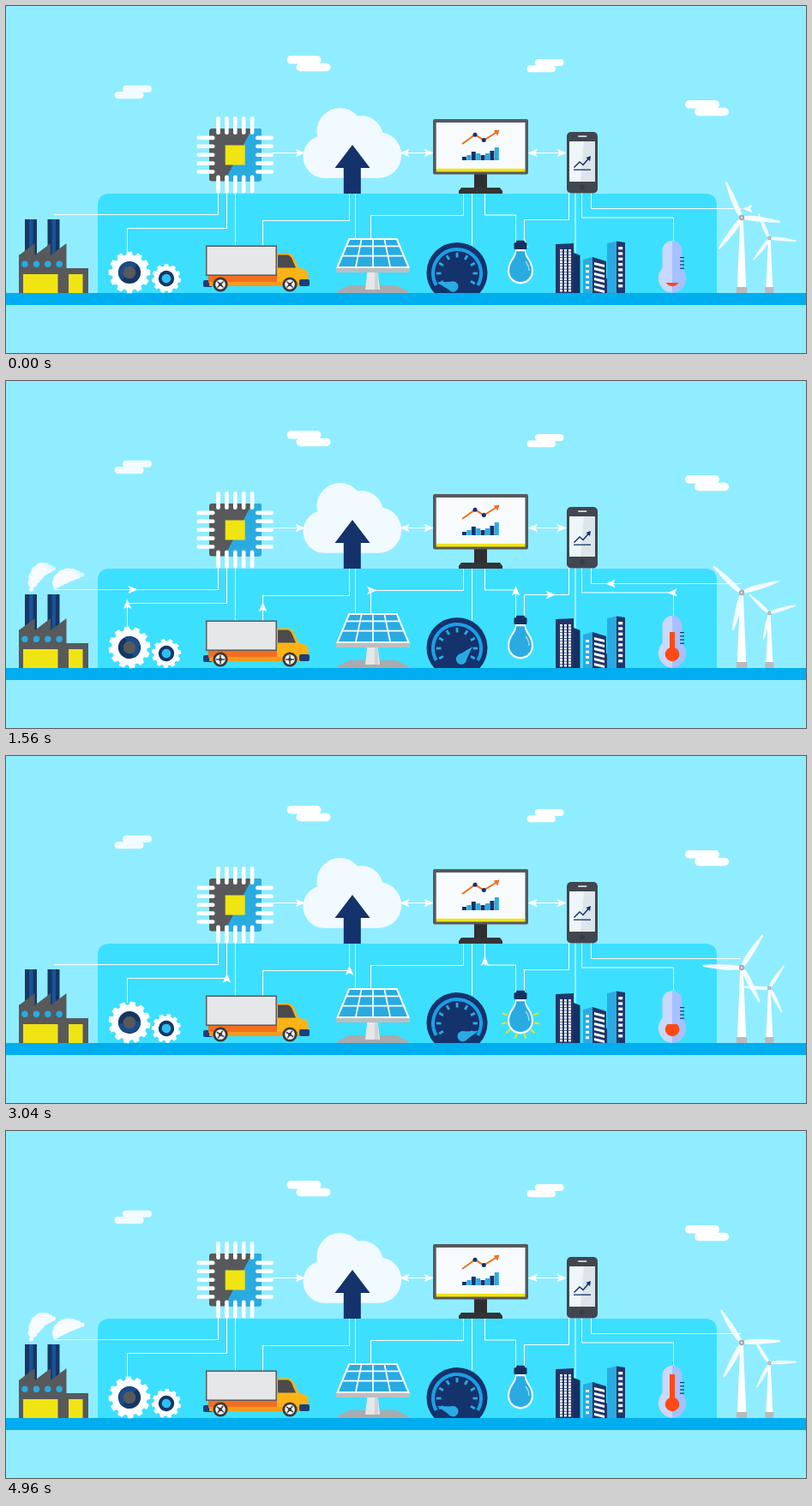
These frames come from a looping animation (933 by 405 pixels, 5 s). An HTML page:

```html
<!DOCTYPE html>
<html lang="en">
<head>
<meta charset="utf-8">
<title>Connected city</title>
<style>
html, body { margin: 0; width: 100%; height: 100%; overflow: hidden; background: #90edff; }
svg { display: block; width: 933px; height: 405px; }
</style>
</head>
<body>
<svg id="stage" viewBox="0 0 933 405" xmlns="http://www.w3.org/2000/svg"></svg>
<script>
const LOOP = 5000, STEP = 40, TOP = 218;
const NAVY = '#14326b', BLUE = '#29abe2', GREY = '#58595b', YELLOW = '#f0e513', ORANGE = '#f26f21';
const stage = document.getElementById('stage');
const $ = id => document.getElementById(id);

// Markup helpers
const each = (n, f) => Array.from({ length: n }, (_, i) => f(i)).join('');
const rect = (x, y, w, h, fill, r = 0) =>
  `<rect x="${x}" y="${y}" width="${w}" height="${h}" rx="${r}" fill="${fill}"/>`;
const disc = (x, y, r, fill) => `<circle cx="${x}" cy="${y}" r="${r}" fill="${fill}"/>`;
const poly = (points, fill) => `<polygon points="${points}" fill="${fill}"/>`;
const path = (d, fill) => `<path d="${d}" fill="${fill}"/>`;
const line = (d, stroke, w) => `<path d="${d}" fill="none" stroke="${stroke}" stroke-width="${w}"/>`;
const group = (id, body, at = '0 0') => `<g id="${id}" transform="translate(${at})">${body}</g>`;
const spin = (n, body) => each(n, i => `<g transform="rotate(${i * 360 / n})">${body}</g>`);
const spoke = (cx, cy, r1, r2, deg, stroke, w) => {
  const a = deg * Math.PI / 180, c = Math.cos(a), s = Math.sin(a);
  return line(`M${cx + r1 * c} ${cy + r1 * s}L${cx + r2 * c} ${cy + r2 * s}`, stroke, w);
};
// Trapezoid with a vertical axis at x
const taper = (x, y1, w1, y2, w2, fill) =>
  poly([x - w1 / 2, y1, x + w1 / 2, y1, x + w2 / 2, y2, x - w2 / 2, y2], fill);

// Timing helpers
const ramp = (t, a, b) => b > a ? Math.max(0, Math.min(1, (t - a) / (b - a))) : +(t >= b);
const ease = (t, a, b) => { const p = ramp(t, a, b); return p * p * (3 - 2 * p); };

// Each wire rises from (x, y) to a level, runs to another column, then climbs;
// its arrow does one leg between each pair of times
const ROUTES = [
  { x: 56, y: 243.5, level: 243.5, to: 247.5, at: [.67, .67, 2.5, 3] },
  { x: 141.5, y: 288, level: 259.5, to: 257.5, at: [.67, 1.67, 3, 4] },
  { x: 299.5, y: 283, level: 250.5, to: 400.5, at: [1, 2, 3, 4] },
  { x: 425.5, y: 275, level: 244.5, to: 533.5, at: [.5, 1.5, 2.5, 3] },
  { x: 594.5, y: 277, level: 244, to: 558.5, at: [.67, 1.67, 2.85, 3.5] },
  { x: 604.5, y: 277, level: 249.5, to: 656.5, at: [0, 1, 2, 3] },
  { x: 865, y: 236.5, level: 236.5, to: 682.5, at: [0, 0, 2, 3] },
  { x: 778.5, y: 278, level: 247, to: 671.5, at: [.5, 1.5, 2.5, 3] }
];
const HEAD = 'M6 0L-5.5 -4.7L-3 0L-5.5 4.7Z';

function sky() {
  const puff = (x, y, w, dx, fill) => {
    const h = w * .24;
    return rect(x, y, w, h, fill, h / 2) + rect(x + dx, y + h * .9, w, h, fill, h / 2);
  };
  return puff(136, 92.7, 34, -9.5, '#f2fcff') + puff(327.5, 58, 40, 11, '#fff') +
    puff(617, 62, 33.5, -9.5, '#fff') + puff(792, 110, 40, 11, '#fff') +
    path('M107 335V233Q107 219 121 219H815Q829 219 829 233V335Z', '#3ddfff') +
    rect(0, 335, 933, 14, '#00aeef');
}

function wires() {
  const head = (x, deg) => `<path d="${HEAD}" fill="#fff" transform="translate(${x} 171.5) rotate(${deg})"/>`;
  const link = (a, b, both) => line(`M${a} 171.5H${b}`, '#fff', 1) + head(b - 5, 0) + (both ? head(a + 5, 180) : '');
  const stub = (x, y) => line(`M${x} ${TOP}V${y}`, '#fff', 1);
  return ROUTES.map(r => line(`M${Math.min(r.x, 857)} ${r.y}V${r.level}H${r.to}V${TOP}`, '#fff', 1)).join('') +
    stub(267.5, 280) + stub(407.5, 273) + stub(543.5, 279) + stub(664, 292) +
    link(311, 348, false) + link(460, 498, true) + link(609.5, 653, true);
}

function chip() {
  const pins = spin(4, each(5, i => rect(-22.1 + i * 9.9, -44.8, 4.6, 21, '#fff', 2)));
  return rect(237, 143, 61, 61.5, GREY, 3) +
    path('M287 143H295Q298 143 298 146V201.5Q298 204.5 295 204.5H255Z', BLUE) +
    group('pins', pins, '267.3 173.7') + rect(255.7, 162.5, 23, 23, YELLOW);
}

function cloud() {
  const fill = '#f1faff';
  return disc(371.5, 175.8, 25, fill) + disc(389.5, 146, 27, fill) + disc(414.5, 153.5, 25.5, fill) +
    disc(434.5, 174, 26.7, fill) + rect(371, 150, 64, 50.8, fill) +
    taper(404, 162, 0, 189, 41, NAVY) + rect(393.8, 188, 20, 31, NAVY);
}

function monitor() {
  const bars = [4, 6, 10, 8, 6, 8, 11, 15];
  return rect(546, 195, 15, 19, '#2f2f31') + taper(553.5, 212, 45, 216, 51, '#333437') +
    rect(528, 215.5, 51, 3.5, '#333437') +
    rect(498, 132, 111, 64.5, GREY, 2) + rect(501.7, 136, 103.8, 54.5, '#f7fbfe') +
    rect(501.7, 189.8, 103.8, 3.7, YELLOW) +
    bars.map((h, i) => rect(532 + i * 5.4, 180 - h, 5, h, i % 2 ? BLUE : NAVY)).join('') +
    line('M532 161L547 150.3L557.3 156.5L572 147.5', ORANGE, 2) +
    poly('575.5,144.5 573.3,151.5 568.5,145.5', ORANGE) +
    disc(547, 150.3, 2.5, NAVY) + disc(557.3, 156.5, 2.5, NAVY);
}

function phone() {
  return rect(654, 147, 36, 71.5, '#414650', 5) + rect(657, 158, 30, 47, '#dce5e9') +
    poly('657,158 674,158 670,205 657,205', '#eff6f9') +
    rect(667, 151.2, 10.5, 1.8, '#d5dbe0', 0.9) + disc(672, 211.5, 3, '#383c45') +
    line('M662.5 188.5L669 182L673 185.5L679.5 178', NAVY, 1.5) +
    poly('682,175 681,181 676.5,177', NAVY) + rect(662, 190.5, 20, 1.3, NAVY);
}

function factory() {
  const stack = x => rect(x, 249, 14, 45, '#143764') + rect(x + 5, 249, 4.5, 45, '#1b5299');
  return stack(22) + stack(48.5) +
    each(3, i => poly([15 + i * 18.5, 291, 33.5 + i * 18.5, 277, 33.5 + i * 18.5, 291], GREY)) +
    rect(15, 290.5, 55.5, 44.5, GREY) + rect(15, 306, 81, 29, GREY) +
    each(4, i => disc(22 + i * 13.4, 301.3, 3.7, BLUE)) +
    rect(20, 313, 40.5, 22, YELLOW) + rect(73, 313, 16.5, 22, YELLOW);
}

// Discs that swell and shrink along a bend from the chimney to the tip,
// in one path so that overlaps do not add up
const PLUMES = [{ x: 29.5, y: 243, dx: 26, dy: -24 }, { x: 57.5, y: 240, dx: 31.5, dy: -14 }];
const plume = p => each(8, i => {
  const u = i / 7, r = 2.6 + 6 * Math.sin(Math.PI * u ** .9);
  const x = p.x + p.dx * u ** 1.4, y = p.y + p.dy * Math.sin(Math.PI / 2 * Math.min(1, u * 1.4));
  return `M${x - r} ${y}a${r} ${r} 0 1 1 ${2 * r} 0a${r} ${r} 0 1 1 ${-2 * r} 0`;
});
const smoke = () => PLUMES.map((p, i) =>
  `<linearGradient id="mist${i}" gradientUnits="userSpaceOnUse"><stop stop-color="#f5fbff"/>` +
  `<stop offset="1" stop-color="#f5fbff" stop-opacity="0"/></linearGradient>` +
  path(plume(p), `url(#mist${i})`)).join('');

function gears() {
  const gear = (r, teeth) => disc(0, 0, r * .85, '#fff') +
    spin(teeth, taper(0, -r, r * .24, -r * .7, r * .38, '#fff')) + disc(0, 0, r * .54, '#143764');
  return group('gearA', gear(24.3, 12) + path('M-9.3 9.3A13.2 13.2 0 0 1 9.3 -9.3Z', '#1b4c8c') +
      disc(0, 0, 7.3, GREY), '144 311') +
    group('gearB', gear(17, 11) + disc(0, 0, 5.3, '#2cc0f2'), '187 318');
}

function truck() {
  const wheel = (id, x) => disc(x, 325, 8.6, '#39393c') + group(id, disc(0, 0, 5.8, '#f3f3f3') +
    line('M-5 0H5M0 -5V5', '#4a4a4d', 1.6) + disc(0, 0, 2, '#39393c'), `${x} 325`);
  return rect(230, 320, 11, 8, '#1b3f7a', 2) +
    path('M315 288.5H328Q333 288.5 335.5 293L341 305L349 308Q352 309 352.5 313L353 327H315Z', '#fcb316') +
    path('M317 290.5H327.5Q331.5 290.5 333.5 295L338 305.5H317Z', '#4b4a4c') +
    rect(236, 314, 80, 9, ORANGE) + rect(237, 322, 104, 5, '#f79a1c') +
    rect(342, 319, 12, 8, '#1b3f7a', 2) +
    '<rect x="233.7" y="280.2" width="81.5" height="34" fill="#e6e7e8" stroke="#58595b" stroke-width="1.5"/>' +
    wheel('wheelA', 250) + wheel('wheelB', 331);
}

function solar() {
  const width = v => 54 + 26 * v, y = v => 273 + 31 * v;
  const column = u => `M${428 + u * width(0)} ${y(0)}L${428 + u * width(1)} ${y(1)}`;
  const row = v => `M${428 - width(v) / 2} ${y(v)}h${width(v)}`;
  return taper(427.7, 326, 55, 333, 83, '#a9abae') + rect(386, 333, 83.5, 2, '#a9abae') +
    taper(427.5, 308, 12, 331, 17, '#e6e7e8') + rect(430, 308, 4, 23, '#d0d2d3') +
    taper(428, 271, 57, 306, 86, '#fff') + rect(385, 306, 86, 5, '#bcbec0', 1) +
    taper(428, y(0), width(0), y(1), width(1), BLUE) +
    line(column(-.25) + column(0) + column(.25) + row(.24) + row(.6), '#fff', 1.7);
}

function gauge() {
  return path('M499.5 335A35.5 35.5 0 1 1 552.5 335Z', NAVY) +
    line('M501.8 326A28 28 0 1 1 550.2 326', '#1aa0e8', 4) +
    each(9, i => spoke(526, 312, 18.5, 24, 150 + i * 30, BLUE, 2.8)) +
    group('needle', disc(0, -6, 6.2, BLUE) + taper(0, -25.5, 0, -9, 10, BLUE));
}

function bulb() {
  const glass = (y, s, fill) => `<path d="M-5.5 -26H5.5C6 -16 15 -12 15 .5A15 15 0 0 1 -15 .5C-15 -12 -6 -16 -5.500 -26Z"
    fill="${fill}" transform="translate(600 ${y}) scale(${s})"/>`;
  return group('rays', each(8, i => spoke(600, 308, 16.5, 22.5, 200 - i * 220 / 7, '#e8e31c', 2))) +
    glass(309, 1, '#fff') + glass(308.7, .86, BLUE) + line('M606 298Q610 303 610 309', '#8fdcf7', 1.5) +
    rect(592.5, 276, 15, 8, '#14305e', 1.5) + rect(595, 273.8, 10, 3, '#14305e', 1);
}

function city() {
  const dark = '#20366b';
  // Block whose roof runs from y1 to y2
  const block = (x, w, y1, y2, fill) => poly([x, 335, x, y1, x + w, y2, x + w, 335], fill);
  const windows = (x, y, rows, step, w, h, tilt = 0) => each(rows, i =>
    poly([x, y + i * step, x + w, y + tilt + i * step, x + w, y + tilt + h + i * step, x, y + h + i * step], '#fff'));
  return block(641, 21, 278, 277, dark) + block(662, 7.5, 288, 291, '#17305f') +
    each(3, i => windows(646 + i * 5, 284, 15, 3.35, 2.9, 2.6)) +
    block(673, 11, 296, 293, BLUE) + windows(676, 302, 5, 6.3, 4, 3) +
    block(684, 16, 293, 298, dark) + windows(686, 299, 6, 6, 12, 2.9, 3) +
    rect(698, 318, 15, 17, dark) + block(701, 11, 277, 274.5, BLUE) +
    block(712, 10, 274.5, 276, dark) + windows(714.2, 281, 8, 6.3, 5, 3.3);
}

function thermo() {
  const half = (sweep, fill) => path(`M777 274A11.5 11.5 0 0 ${sweep} ${sweep ? 788.5 : 765.5} 285.5V306` +
    `A17.3 17.3 0 0 ${sweep} 777 335Z`, fill);
  return half(0, '#c9d8ff') + half(1, '#a6c1ff') +
    '<clipPath id="level"><rect id="mercury" x="764" width="26" height="60"/></clipPath>' +
    `<g clip-path="url(#level)">${rect(774, 284, 6, 36, '#ff4a17') + disc(777, 319, 8.3, '#ff4a17')}</g>` +
    each(4, i => rect(786, 293 + i * 4.2, 5, 1.2, NAVY));
}

function turbine(id, x, y, s, w) {
  const blade = path('M1 -1.5C9 -4.5 20 -4 44.5 -1Q46.5 0 44.5 1.2C26 3 10 3 1 1.5Z', '#f4fcff');
  return taper(x, y, w * .64, 329, w * 2, '#fff') + rect(x - w - 1, 328, w * 2 + 2, 7, '#b9bbbd') +
    `<g transform="translate(${x} ${y}) scale(${s})">` + group(id, spin(3, blade)) +
    disc(0, 0, 3.2, '#a7a9ac') + disc(0, 0, 1.3, '#d8dadb') + '</g>';
}

stage.innerHTML = sky() + wires() +
  each(ROUTES.length, i => `<path id="arrow${i}" d="${HEAD}" fill="#fff"/>`) +
  chip() + cloud() + monitor() + phone() + group('smoke', smoke()) + factory() + gears() + truck() +
  solar() + gauge() + bulb() + city() + thermo() +
  turbine('rotorA', 858, 247, 1, 5.2) + turbine('rotorB', 890.3, 271, .7, 4);

const rays = [...$('rays').children];
const set = (id, name, value) => $(id).setAttribute(name, value);
const show = (node, on) => node.setAttribute('visibility', on ? 'visible' : 'hidden');
const turn = (id, deg, at = '0 0') => set(id, 'transform', `translate(${at}) rotate(${deg})`);

function moveArrow(r, i, t) {
  const [start, rise, run, end] = r.at;
  show($('arrow' + i), t >= start && t < end);
  const x = r.x + (r.to - r.x) * ease(t, rise, run);
  const y = r.y + (r.level - r.y) * ease(t, start, rise) + (TOP + 3 - r.level) * ease(t, run, end);
  const level = t >= rise && t < run;
  turn('arrow' + i, level ? (r.to > r.x ? 0 : 180) : -90, `${x} ${y}`);
}

// A soft edge wipes each plume in along its length, then the whole fades
function drawSmoke(t) {
  const age = t % 3.1, edge = -.5 + 1.5 * ramp(age, .2, 1.8);
  set('smoke', 'opacity', 1 - ramp(age, 2, 3));
  PLUMES.forEach((p, i) => [edge, edge + .5].forEach((e, k) => {
    set('mist' + i, 'x' + (k + 1), p.x + p.dx * e);
    set('mist' + i, 'y' + (k + 1), p.y + 4 + (p.dy - 8) * e);
  }));
}

function draw(t) {
  ROUTES.forEach((r, i) => moveArrow(r, i, t));
  turn('rotorA', 6 + 216 * t);
  turn('rotorB', 6 + 216 * t);
  turn('gearA', 72 * t, '144 311');
  turn('gearB', -72 * t, '187 318');
  turn('wheelA', 45 + 144 * t, '250 325');
  turn('wheelB', 45 + 144 * t, '331 325');
  turn('needle', -75 + 150 * (ramp(t, 0, 2) - ramp(t, 3, 5)), '527 329');
  set('mercury', 'y', 323 - 39 * ease(t, 0, 1) + 29 * (ease(t, 1, 2.5) - ease(t, 3.5, 4.2)));
  const glow = t % (5 / 3);
  rays.forEach((ray, i) => show(ray, glow > .12 + i * .09 && glow < 1.5));
  drawSmoke(t);
}

function tick() {
  const ms = performance.now() % LOOP;
  draw(Math.floor(ms / STEP) * STEP / 1000);
  requestAnimationFrame(tick);
}
tick();
</script>
</body>
</html>
```
